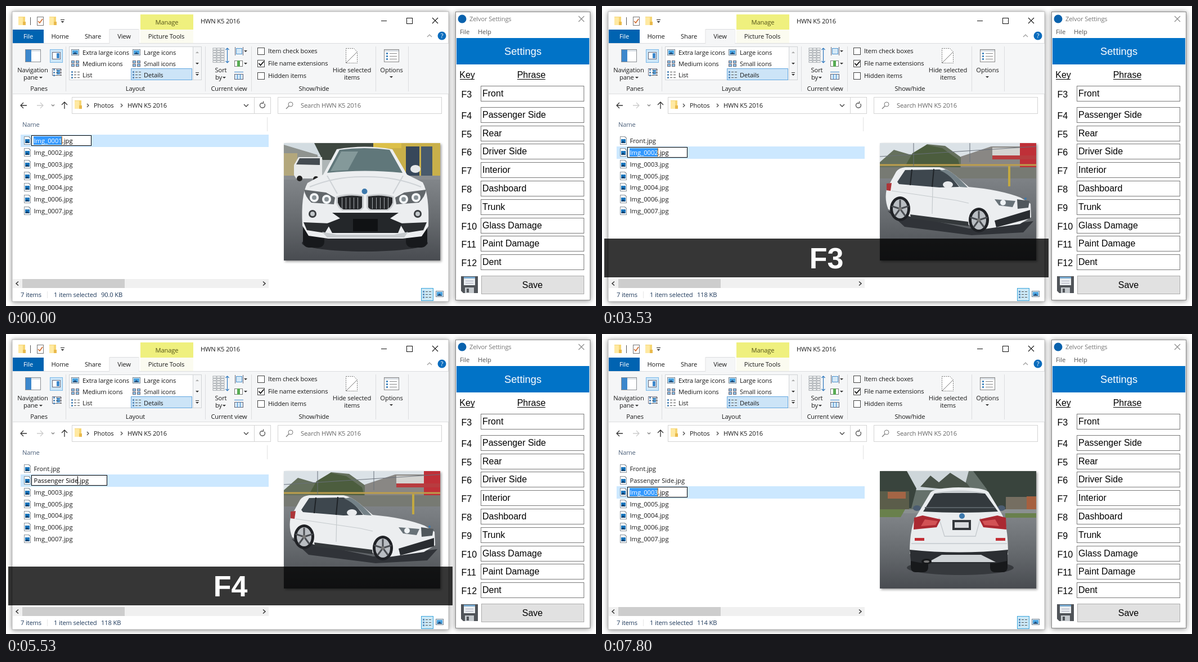
Recreate the animation shown at these times as an HTML page. Size 1049 by 534 pixels, loop 8000 ms.

```html
<!DOCTYPE html>
<html lang="en">
<head>
<meta charset="utf-8">
<title>Renaming photos</title>
<style>
html, body { margin: 0; width: 100%; height: 100%; overflow: hidden; background: #fff; }
svg { display: block; width: 1049px; height: 534px; }
text { font: 11.2px "Open Sans", "Noto Sans", sans-serif; letter-spacing: -.15px; white-space: pre; }
.file { letter-spacing: 0; }
.mid { text-anchor: middle; }
.form { font: 16px "Liberation Sans", Arial, sans-serif; letter-spacing: 0; }
.head { font-size: 18.3px; }
.key { font: bold 52px "Liberation Sans", Arial, sans-serif; letter-spacing: 0; }
.win { filter: drop-shadow(0 1px 5px #0007); }
.pic { filter: drop-shadow(2px 2px 2px #0006); }
</style>
</head>
<body>
<svg id="stage" viewBox="0 0 1049 534"></svg>
<script>
const rect = (x, y, w, h, fill, more = '') =>
  `<rect x="${x}" y="${y}" width="${w}" height="${h}" fill="${fill}" ${more}/>`;
const box = (x, y, w, h, stroke, fill = 'none') =>
  rect(x + .5, y + .5, w - 1, h - 1, fill, `stroke="${stroke}"`);
const text = (x, y, s, cls = '', fill = '#1a1a1a') =>
  `<text x="${x}" y="${y}" class="${cls}" fill="${fill}">${s}</text>`;
const mid = (x, y, s, fill) => text(x, y, s, 'mid', fill);
const line = (d, stroke, w = 1) =>
  `<path d="${d}" fill="none" stroke="${stroke}" stroke-width="${w}"/>`;
const shape = (d, fill) => `<path d="${d}" fill="${fill}"/>`;
const dot = (x, y, r, fill, ry = r) =>
  `<ellipse cx="${x}" cy="${y}" rx="${r}" ry="${ry}" fill="${fill}"/>`;
const arrow = (x, y) => shape(`M${x - 3} ${y}h6l-3 3z`, '#333');
const vline = (x, y, h, c) => line(`M${x + .5} ${y}v${h}`, c);
const each = (n, f) => Array.from({ length: n }, (_, i) => f(i)).join('');
const folder = (x, y) => rect(x, y, 12, 15, '#f6d675') + rect(x, y + 1, 8, 14, '#ffe9a2') +
  shape(`M${x + 8} ${y + 9}h5v6h-5z`, '#e9b94c');
const picture = (x, y, w, h) => box(x, y, w, h, '#6f7f8e', '#eaf5fd') +
  rect(x + 2, y + 2, w - 4, h - 4, '#4aa3e0') +
  shape(`M${x + 2} ${y + h - 2}l${w / 3} -4 ${w / 2 - 2} 4z`, '#234d78');
const listIcon = (x, y) => each(3, i =>
  rect(x, y + i * 5, 3, 3, '#5d8fbd') + rect(x + 5, y + 1 + i * 5, 4, 1, '#555') +
  rect(x + 11, y + 1 + i * 5, 4, 1, '#555'));
const gridIcon = (x, y) => each(4, i => box(x + i % 2 * 8, y + (i >> 1) * 6, 6, 5, '#667', '#8cc3ea'));
const chevron = (x, y) => line(`M${x} ${y - 3}l3 3 -3 3`, '#444', 1.2);
const cross = (x, y, r, c) => line(`M${x - r} ${y - r}l${2 * r} ${2 * r}m0 ${-2 * r}l${-2 * r} ${2 * r}`, c, 1.1);

const title = 'HWN K5 2016';

function explorer() {
  const rule = '#dcdddf';
  const checks = ['Item check boxes', 'File name extensions', 'Hidden items'];
  return rect(11, 10, 776, 516, '#fff', 'class="win" stroke="#9a9a9a" stroke-width=".6"') +
    // title bar and tabs
    folder(22, 19) + line('M43.5 20v14', '#555') + box(55, 19, 12, 16, '#777', '#fff') +
    line('M57 27l3 3 5-7', '#d06a2c', 1.6) + folder(77, 19) + rect(97, 24, 7, 1, '#222') + arrow(100.5, 27) +
    rect(239, 15, 94, 27, '#eff07e') + mid(286, 33, 'Manage', '#55541a') +
    rect(239, 42, 94, 24, '#fbfbf0') + text(346, 31, title) +
    rect(667, 26, 10, 1, '#111') + box(712, 21, 11, 11, '#111') + cross(763, 26, 5, '#111') +
    rect(12, 66, 775, 91, '#f5f6f7') + line('M12 66.5h172V41.5h52v25h551M12 156.5h775', rule) +
    rect(185, 42, 51, 26, '#f5f6f7') + rect(12, 42, 55, 24, '#0063b1') +
    mid(39.5, 58, 'File', '#fff') + mid(96, 58, 'Home') + mid(154.5, 58, 'Share') + mid(210, 58, 'View') +
    mid(285, 58, 'Picture Tools') + line('M749 55l4-4 4 4', '#999', 1.2) +
    dot(775, 53, 7.5, '#0a6cbd') + mid(775, 57, '?', '#fff') +
    // ribbon
    [106, 354, 436, 657, 715].map(x => vline(x, 72, 80, rule)).join('') +
    box(34, 77, 28, 23, '#8a8f94', '#fff') + rect(35, 78, 10, 21, '#3c87cc') + rect(45, 78, 16, 3, '#dde3e8') +
    mid(47.5, 118, 'Navigation') + text(31, 131, 'pane') + arrow(62, 126) +
    box(78, 77, 23, 24, '#79b8e8', '#cde6f8') + box(82, 82, 15, 13, '#667', '#fff') + rect(90, 84, 5, 9, '#3c87cc') +
    box(82, 111, 16, 13, '#778', '#fff') + rect(90, 113, 6, 9, '#5597cf') + listIcon(84, 112) +
    mid(58.5, 151, 'Panes') +
    box(112, 72, 236, 60, '#cfd2d5', '#fff') + rect(333, 73, 14, 58, '#f5f6f7') + vline(332, 72, 60, '#cfd2d5') +
    box(222, 111, 109, 21, '#62a7df', '#cce4f7') +
    picture(116, 77, 14, 11) + gridIcon(116, 97) + listIcon(116, 116) +
    picture(225, 77, 14, 11) + gridIcon(225, 97) + listIcon(225, 116) +
    ['Extra large icons', 'Medium icons', 'List', 'Large icons', 'Small icons', 'Details'].map((s, i) =>
      text(i < 3 ? 136 : 245, 86.5 + i % 3 * 20, s)).join('') +
    shape('M337 84h6l-3-3z', '#aaa') + arrow(340, 101) + rect(337, 118, 6, 1, '#333') + arrow(340, 121) +
    mid(230, 151, 'Layout') +
    each(6, i => each(3, j => rect(368 + j * 7, 75 + i * 4.5, 6, 3, '#fff', 'stroke="#90969c" stroke-width=".8"'))) +
    line('M393.5 76v25m-3-3l3 3 3-3m-6-20l3-3 3 3', '#2f78bd', 1.2) +
    mid(382, 118, 'Sort') + text(372, 131, 'by') + arrow(388, 126) +
    box(409, 75, 11, 11, '#4d93cd', '#d5e9f8') + line('M407.5 73v15m14-15v15', '#667') + arrow(426, 79) +
    box(406, 97, 15, 11, '#777', '#fff') + rect(411, 97, 5, 11, '#58ab53') + arrow(426, 101) +
    box(406, 121, 16, 10, '#667', '#d5e9f8') + line('M406 117.5h16M411.5 121v10m5-10v10', '#3c87cc') +
    mid(396.5, 151, 'Current view') +
    checks.map((s, i) => box(447, 74 + i * 22, 13, 13, '#444', '#fff') + text(466, 84 + i * 22, s)).join('') +
    line('M449.5 102l3 3.5 6-7', '#111', 1.8) +
    `<path d="M604.5 75.5h14l6 6v20h-20z" fill="#fff" stroke="#777" stroke-dasharray="2 1.5"/>` +
    line('M604.5 101.5l20-20', '#777') +
    mid(615, 118, 'Hide selected') + mid(615, 131, 'items') + mid(547.5, 151, 'Show/hide') +
    box(672, 77, 27, 23, '#888', '#fff') + rect(673, 78, 25, 3, '#d8dde2') +
    each(3, i => rect(676, 83 + i * 5, 3, 3, '#4588c0') + rect(682, 84 + i * 5, 13, 1, '#888')) +
    mid(685.5, 118, 'Options') + arrow(685, 125) +
    // address and search
    line('M37 177H26m5-5l-5 5 5 5', '#333', 1.3) + line('M55 177h11m-5-5l5 5-5 5', '#ccc', 1.3) +
    line('M81 175.5l2.5 2.5 2.5-2.5', '#777', 1.2) + line('M104 183v-12m-5 5l5-5 5 5', '#333', 1.3) +
    box(117, 162, 354, 30, '#d4d4d4') + folder(122, 168) + chevron(144, 177) + text(156, 181, 'Photos') +
    chevron(204, 177) + text(216, 181, title) + line('M423 175l4 4 4-4', '#444', 1.4) + vline(441, 162, 29, '#d4d4d4') +
    line('M459.5 174a4.5 4.5 0 1 1-5-1.500m3-3v3.500h-4', '#555', 1.3) +
    box(483, 162, 292, 30, '#d4d4d4') + '<circle cx="506" cy="175" r="4" fill="none" stroke="#777"/>' +
    line('M503 178l-5 5', '#777', 1.2) + text(524, 181, 'Search ' + title, '', '#666') +
    // list frame and status
    text(29, 215, 'Name', '', '#4c607a') + vline(464, 198, 25, '#e2e2e2') +
    rect(12, 486, 455, 16, '#f0f0f0') + rect(29, 486, 182, 16, '#cdcdcd') +
    line('M22 490.500l-4 3.500 4 3.500M457 490.500l4 3.500-4 3.500', '#333', 1.5) +
    text(26, 518, '7 items', '', '#1e395b') + vline(73, 508, 12, '#e6e6e6') +
    text(85, 518, '1 item selected', '', '#1e395b') +
    box(738, 502, 22, 23, '#3aa5dc', '#cbe8f6') + listIcon(741, 507) + picture(764, 507, 14, 11);
}

function settings() {
  const phrases = ['Front', 'Passenger Side', 'Rear', 'Driver Side', 'Interior',
    'Dashboard', 'Trunk', 'Glass Damage', 'Paint Damage', 'Dent'];
  return rect(799.5, 10.5, 239, 513, '#fff', 'class="win" stroke="#888"') +
    dot(811, 23, 7.5, '#0a62ad') + text(824, 27, 'Zelvor Settings', '', '#777') + cross(1023, 23, 5, '#888') +
    text(807, 49.5, 'File', '', '#555') + text(839, 49.5, 'Help', '', '#555') +
    rect(801, 57, 236, 47, '#0173c7') + text(919, 87, 'Settings', 'form head mid', '#fff') +
    text(820, 128, 'Key', 'form mid', '#000') + text(934, 128, 'Phrase', 'form mid', '#000') +
    rect(807, 130, 26, 1, '#000') + rect(909, 130, 50, 1, '#000') +
    phrases.map((s, i) => {
      const y = i ? Math.round(147 + i * 32.8) : 142;
      return box(844, y, 184, 28, '#7a7a7a', '#fff') + text(847, y + 19, s, 'form', '#000') +
        text(809.5, y + 21, 'F' + (i + 3), 'form', '#000');
    }).join('') +
    shape('M809 481h30v30h-26l-4-4z', '#505459') + rect(814, 482, 20, 15, '#e9edf0') +
    rect(814, 482, 20, 3, '#78a9cf') + rect(817, 489, 14, 1, '#aab') + rect(817, 493, 14, 1, '#aab') +
    rect(816, 501, 16, 10, '#c3c8cc') + rect(819, 503, 4, 7, '#505459') +
    box(845, 480, 183, 33, '#adadad', '#e1e1e1') + text(936, 502, 'Save', 'form mid', '#000');
}

const ground = (y, top) => rect(494, y, 278, 454 - y, 'url(#wet)') + rect(494, y, 278, 7, top);
const wheel = (x, y) => dot(x, y, 18, '#202226', 22) + dot(x, y, 13, '#b9bdc2', 17) +
  each(5, i => `<path d="M${x} ${y}v-16" stroke="#4a4d52" stroke-width="3" transform="rotate(${i * 72} ${x} ${y})"/>`) +
  dot(x, y, 3, '#777');
// draws a left-hand part and its mirror about x = c
const pair = (c, s) => s + `<g transform="matrix(-1 0 0 1 ${2 * c} 0)">${s}</g>`;

const photos = [
  rect(494, 244, 278, 66, '#aeb5b6') + rect(494, 244, 70, 24, '#d3dce1') +
  shape('M494 247l60 18v10h-60z', '#8f938f') + rect(494, 262, 24, 43, '#b3a77c') +
  shape('M548 244h105v30h-90z', '#3e4740') + rect(653, 244, 119, 61, '#c9b04a') +
  rect(653, 244, 50, 9, '#dcc04a') + rect(711, 250, 24, 52, '#37475a') + rect(738, 250, 20, 52, '#485a6c') +
  ground(302, '#898d91') +
  shape('M512 283l8-14h42v38h-46l-4-6z', '#e8eaeb') + shape('M516 282l6-11h36v12z', '#454c52') +
  dot(522, 307, 5, '#222') + dot(551, 308, 5, '#222') +
  dot(638, 422, 112, '#2a2c30', 15) +
  pair(638.5, rect(528, 385, 38, 45, '#17191c', 'rx="10"') + dot(549, 290, 9, '#e6e8ea', 7)) +
  shape('M564 300l24-45q50-9 99 0l26 45 28 14q12 22 10 78l-12 18-34 4H573l-35-5-11-18q-3-54 9-76z', '#eceef0') +
  shape('M571 297l22-41q44-6 89 0l23 41q-66-7-134 0z', '#60777a') + shape('M577 294l19-35h30l-18 33z', '#84999a') +
  line('M571 302l18 32m117-32l-18 32M540 322q46-19 98-18 54-1 100 18', '#ced2d6', 2) +
  pair(638.5,
    shape('M530 327l39 5 16 9-2 12-40-3q-11-10-13-23z', '#62676b') + dot(548, 341, 8, '#f4f7f9') + dot(570, 344, 8, '#f4f7f9') +
    dot(548, 341, 4, '#8a9398') + dot(570, 344, 4, '#8a9398') +
    shape('M587 339q22-8 49-2v22q-3 5-9 5h-29q-8-4-11-14z', '#c9cccf') +
    shape('M590 341q20-6 43-2v19q-2 4-7 4h-26q-7-3-10-12z', '#26282b') +
    each(5, i => vline(597 + i * 7, 341, 20, '#a2a7ab')) +
    dot(545, 370, 7, '#3a3d40') + dot(545, 370, 4, '#c2c7ca') +
    shape('M529 385l48 2-10 17-32-5z', '#2b2e31')) +
  shape('M580 368h118l-15 10 21 9-7 17H580l-9-17 23-9z', '#24272a') + rect(617, 379, 44, 22, '#101214') +
  shape('M562 402l26 5h102l25-5-7 10H571z', '#c5c9cc') + dot(637.5, 330, 5, '#3c78ac'),

  rect(494, 243, 278, 50, '#dbe2e7') + shape('M494 278l25-22 34 10 25-20 32 3 28 20 35 10v13H494z', '#65705d') +
  shape('M539 285l13-23 25-15 28 6 28 20 4 14z', '#4c5d3e') +
  shape('M638 268l54-18h80v53H638z', '#898784') + rect(743, 244, 29, 54, '#bf3038') + rect(694, 252, 49, 14, '#d4d4d1') +
  rect(694, 266, 78, 7, '#b83c3f') + line('M494 283h278', '#bd9e4c', 3) + line('M554 243v42m100-42v35m-160-10L772 250', '#69707a') +
  ground(290, '#777b7c') + rect(494, 287, 278, 20, '#777a73') + rect(722, 285, 4, 36, '#c3a941') +
  shape('M508 365l145 31 114-13-18 20-92 5-119-15z', '#303338') +
  shape('M506 326l17-31q5-7 16-8h61q13 2 29 15l23 20q56 5 92 19l18 11 1 24-20 12-70 10-30-12-95-11-39-13q-7-17-3-36z', '#eceef0') +
  shape('M525 313l14-21 61-1q16 5 35 31l-35 1-72-6z', '#3e474e') + shape('M601 293q17 6 35 29l14 1q-24-27-39-32z', '#748187') +
  line('M551 291l-3 28m42-29l-3 32', '#1f2327', 2) + dot(615, 318, 9, '#e9ebed', 6) +
  line('M515 329l115 17 22 5M588 322l-1 48', '#c5cacd', 1.2) + shape('M506 316l9-1-2 14-7-1z', '#ad3438') +
  shape('M548 371l103 13 1 8-103-14z', '#34383b') + shape('M698 344l37 3-5 11-24-3z', '#687278') +
  dot(713, 350, 5, '#eff3f5') + shape('M738 344l22 3-2 12-19 2z', '#50575c') + shape('M698 382l63-19v15l-60 16z', '#292c30') +
  dot(753, 343, 2, '#3c78ac') + wheel(530, 361) + wheel(670, 381),

  rect(494, 244, 278, 73, '#65716b') + shape('M532 244h120l-9 34h-100z', '#ced6da') +
  shape('M494 244h48l17 31-9 35h-56zM660 244h112v72H700l-16-40z', '#39443d') +
  shape('M566 272l18-20 15 12 20-17 30 19 11 15z', '#485249') +
  rect(494, 280, 52, 33, '#5b5d4a') + rect(508, 281, 32, 12, '#a46545') + rect(718, 290, 54, 31, '#756e61') + rect(755, 289, 17, 27, '#a6603f') +
  ground(312, '#8b9091') + shape('M494 312h45l-8 14h-37zM717 319h55v8h-55z', '#69804c') +
  dot(637, 416, 95, '#36393d', 13) + pair(635, rect(549, 388, 31, 36, '#17191b', 'rx="8"') + dot(560, 310, 7, '#4b5c70', 5)) +
  shape('M562 319l22-37q8-8 50-9 44 0 53 8l23 38q12 19 12 73l-10 11H559l-12-12q0-52 15-72z', '#e9ecee') +
  shape('M571 316l20-32q45-4 90 0l23 32q-66 4-133 0z', '#33393d') + shape('M590 283q46-9 91 0z', '#c8cdd0') +
  line('M574 309h125', '#5a6267', 2) + line('M599 327l10 33h55l9-33M550 373h170', '#c4c9cd', 1.3) +
  pair(636.5, shape('M555 327l15-4 32 7-7 14-41 4z', '#aa2932') + shape('M574 330l23 3-4 7-26 2z', '#d25255') +
    rect(556, 363, 17, 5, '#c32f36')) +
  rect(623, 331, 33, 18, '#33373b') + rect(627, 335, 25, 10, '#d8dbde') + dot(640, 324, 5, '#3c78ac') +
  shape('M547 384q88 9 175 0l-2 20-20 4H570l-21-4z', '#2b2e32') + shape('M580 406l24-13h70l26 13z', '#cfd3d6') +
  dot(577, 405, 9, '#17191b', 5) + dot(577, 405, 5, '#777', 2)
];

const stage = document.getElementById('stage');
stage.innerHTML = `<defs><linearGradient id="wet" x2="0" y2="1"><stop stop-color="#84888c"/>
<stop offset=".55" stop-color="#65696d"/><stop offset="1" stop-color="#484b50"/></linearGradient>
<clipPath id="crop"><rect x="494" y="244" width="278" height="209"/></clipPath></defs>` +
  explorer() + settings() + '<g id="live"></g>';
const live = document.getElementById('live');

const names = [1, 2, 3, 5, 4, 6, 7].map(n => 'Img_000' + n);
const typed = ['Front', 'Passenger Side'];
const editWidth = [85, 135];
const typedCaret = [78, 127];
const sizes = ['90.0 KB', '118 KB', '114 KB'];
const starts = [-3, 37, 85];   // ticks at which each rename begins
const typing = [34, 83];       // ticks at which a key is pressed

function draw(tick) {
  const now = tick < 37 ? 0 : tick < 85 ? 1 : 2;
  const done = tick >= typing[now];
  const blink = Math.floor((tick - starts[now]) / 8) % 2 === 0;
  const key = tick >= 34 && tick < 57 ? 'F3' : tick >= 83 && tick < 105 ? 'F4' : '';

  const rows = names.map((name, i) => {
    const top = Math.round(229 + 20.85 * i), base = top + 15;
    const icon = shape(`M32 ${top + 3}h9l3 3v12h-12z`, '#8c949b') +
      shape(`M33 ${top + 4}h7l3 3v10h-10z`, '#fff') + rect(34, top + 8, 8, 7, '#1976bd') +
      shape(`M34 ${top + 15}l3-4 5 4z`, '#123f69');
    if (i !== now) return icon + text(49.5, base, (i < now ? typed[i] : name) + '.jpg', 'file');
    const edit = rect(26, top, 441, 22, '#cce8ff') + icon +
      box(45, top + 1, done ? editWidth[i] : 107, 19, '#000', '#fff');
    if (done) return edit + text(49.5, base, typed[i] + '.jpg', 'file', '#000') +
      (tick === typing[i] ? rect(typedCaret[i], top + 3, 1, 15, '#000') : '');
    return edit + rect(49, top + 3, 51, 15, '#3399ff') +
      `<text x="49.5" y="${base}" class="file" fill="#fff">${name}<tspan fill="#000">.jpg</tspan></text>` +
      (blink ? rect(99, top + 3, 1, 15, '#cc6600') : '');
  }).join('');

  live.innerHTML = rows + text(169, 518, sizes[now], '', '#1e395b') +
    `<g class="pic"><g clip-path="url(#crop)">${photos[now]}</g></g>` +
    (key && rect(4, 414, 790, 69, '#000', 'opacity=".79"') + text(399, 466.5, key, 'key mid', '#fff'));
}

let shown = -1;
const begin = performance.now();
function frame() {
  const t = (performance.now() - begin) % 8000;
  const tick = Math.floor((t + 4) * 15 / 1000) % 120;
  if (tick !== shown) draw(shown = tick);
  requestAnimationFrame(frame);
}
frame();
</script>
</body>
</html>
```
